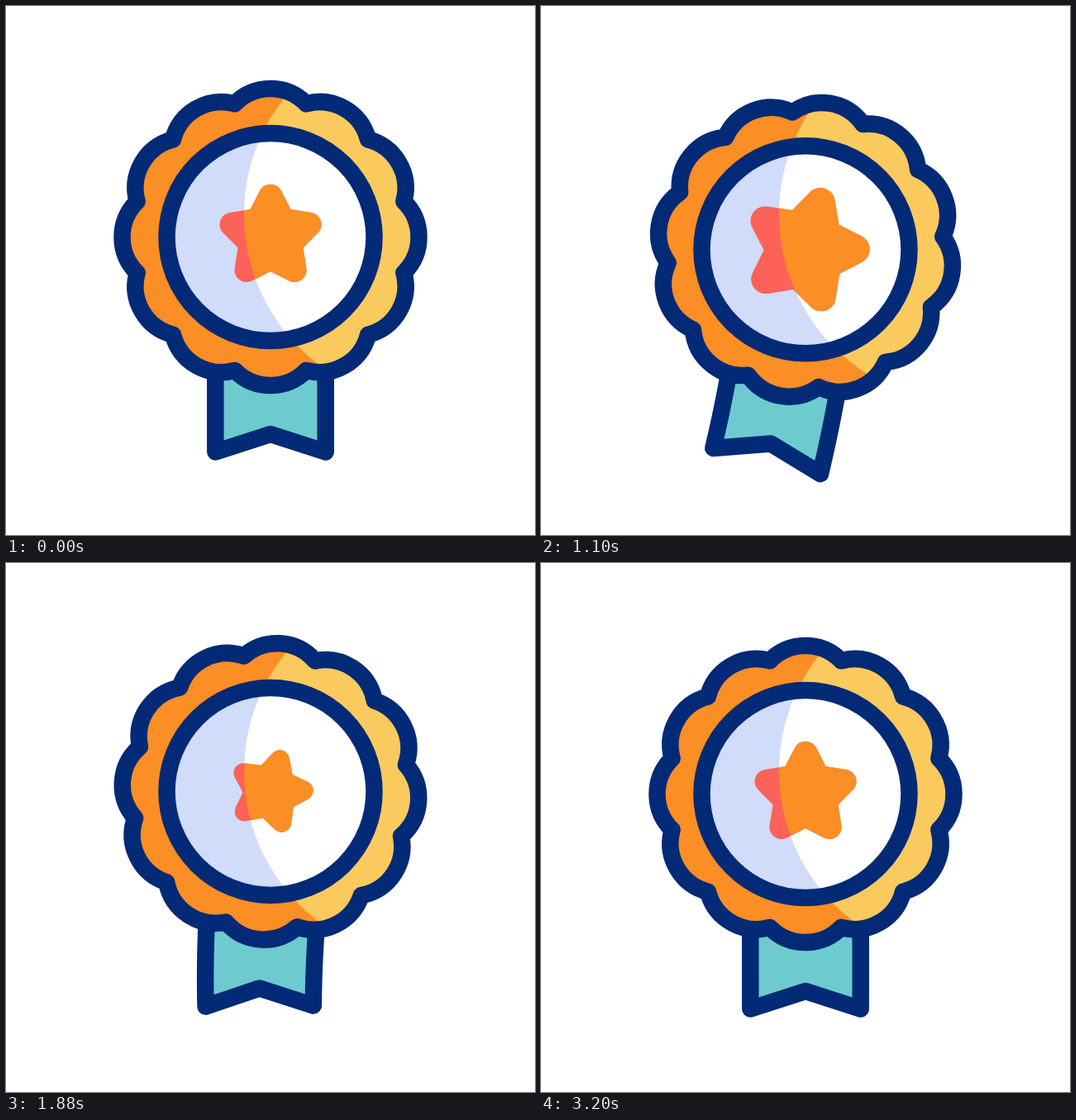
These frames come from a looping animation (640 px wide and 640 px high, 3600 ms). An HTML page with a canvas:

```html
<!DOCTYPE html>
<html lang="en">
<head>
<meta charset="utf-8">
<title>Award badge</title>
<style>
  html, body { margin: 0; width: 100%; height: 100%; overflow: hidden; background: #fff; }
  canvas { display: block; width: 640px; height: 640px; }
</style>
</head>
<body>
<canvas id="stage"></canvas>
<script>
const LOOP = 3600;
const NAVY = '#032a76', TEAL = '#6dcbd0', SPARK = '#ffca50';
const SHADE = { rim: '#fb8e24', face: '#d1dbfa', star: '#fc6257' };
const LIGHT = { rim: '#fbca5e', face: '#ffffff', star: '#fb8e24' };
const LINE = 20.5;
const CX = 320, CY = 279.6;
const RAD = Math.PI / 180;

const canvas = document.getElementById('stage');
const ctx = canvas.getContext('2d');
const dpr = window.devicePixelRatio || 1;
canvas.width = canvas.height = 640 * dpr;

// Keyframes as [time, value]
const LIFT = [[410, 0], [1000, 18], [1580, -20], [2230, 18], [2720, -20], [3210, 0]];
const TILT = [[410, 0], [930, 15], [1540, -15], [2125, 15], [2650, -15], [3190, 0]];
const BEND = [[410, 0], [1000, 5], [1600, -10.5], [2250, 5], [2720, -10.5], [3210, 0]];
const SCALE = [[410, 1], [1180, 1.22], [1950, 0.8], [2720, 1.25], [3210, 1]];
const SPIN = [[410, 0], [760, -1.5], [1380, -106.5], [1880, -199.5],
              [2300, -286], [2720, -329], [3210, -360]];

const clamp = v => Math.min(1, Math.max(0, v));

function find(keys, t) {
  let i = 0;
  while (i < keys.length - 2 && t >= keys[i + 1][0]) i++;
  const [t0, a] = keys[i], [t1, b] = keys[i + 1];
  return { i, a, b, h: t1 - t0, p: clamp((t - t0) / (t1 - t0)) };
}

function ease(keys, t) {
  const { a, b, p } = find(keys, t);
  return a + (b - a) * (1 - Math.cos(Math.PI * p)) / 2;
}

function smooth(keys, t) {
  const { i, a, b, h, p } = find(keys, t);
  const slope = j => j <= 0 || j >= keys.length - 1 ? 0
    : (keys[j + 1][1] - keys[j - 1][1]) / (keys[j + 1][0] - keys[j - 1][0]);
  const q = 1 - p;
  return a * (1 + 2 * p) * q * q + b * p * p * (3 - 2 * p)
    + h * (slope(i) * p * q * q - slope(i + 1) * p * p * q);
}

const polar = (r, deg) => [r * Math.sin(deg * RAD), -r * Math.cos(deg * RAD)];

function rimPath(tilt) {
  const path = new Path2D();
  const notch = 167, lobe = 60.4, mid = 179.5 - lobe;
  const [nx, ny] = polar(notch, 15);
  const half = Math.atan2(nx, -ny - mid);
  for (let k = 0; k < 12; k++) {
    const deg = k * 30 + tilt, [x, y] = polar(mid, deg);
    const up = deg * RAD - Math.PI / 2;
    path.arc(x, y, lobe, up - half, up + half);
  }
  path.closePath();
  return path;
}

function facePath() {
  const path = new Path2D();
  path.arc(0, 0, 125.5, 0, 2 * Math.PI);
  return path;
}

function starPath(scale, spin) {
  const path = new Path2D();
  path.moveTo(...polar(41.5 * scale, spin - 36));
  for (let k = 0; k < 5; k++) {
    const deg = spin + k * 72;
    const inner = polar(41.5 * scale, deg + 36);
    path.arcTo(...polar(81.2 * scale, deg), ...inner, 14.5 * scale);
    path.lineTo(...inner);
  }
  path.closePath();
  return path;
}

function ribbonPath(bend) {
  const path = new Path2D();
  const top = 150, end = 260, side = 66.7;
  const k = (bend * RAD || 1e-6) / (end - top);
  const add = (x, y) => {
    const a = k * Math.max(0, y - top);
    const w = x * (1 + 0.3 * Math.min(0, a));
    const sx = -(1 - Math.cos(a)) / k;
    const sy = y < top ? y : top + Math.sin(a) / k;
    path.lineTo(sx + w * Math.cos(a), sy + w * Math.sin(a));
  };
  for (let y = 110; y <= end; y += 10) add(-side, y);
  add(0, 238.5);
  for (let y = end; y >= 110; y -= 10) add(side, y);
  path.closePath();
  return path;
}

function outline(path) {
  ctx.strokeStyle = NAVY;
  ctx.lineWidth = LINE;
  ctx.stroke(path);
}

function spark(t, x0, y0, x1, y1, start, stop) {
  const head = clamp((t - start) / 200);
  const tail = clamp((t - start - 240) / (stop - start - 240));
  if (head <= tail) return;
  const at = p => [x0 + (x1 - x0) * p, y0 + (y1 - y0) * p];
  ctx.beginPath();
  ctx.moveTo(...at(tail));
  ctx.lineTo(...at(head));
  ctx.strokeStyle = SPARK;
  ctx.lineWidth = 20;
  ctx.stroke();
}

function draw(t) {
  const lift = ease(LIFT, t), tilt = ease(TILT, t);
  const rim = rimPath(tilt), face = facePath();
  const star = starPath(ease(SCALE, t), smooth(SPIN, t));
  const ribbon = ribbonPath(ease(BEND, t));

  ctx.setTransform(dpr, 0, 0, dpr, 0, 0);
  ctx.fillStyle = '#fff';
  ctx.fillRect(0, 0, 640, 640);
  ctx.lineCap = ctx.lineJoin = 'round';

  spark(t, 504, 385, 528, 385, 2620, 3095);
  spark(t, 487.5, 413, 502.5, 441, 2634, 3125);

  ctx.translate(CX, CY + lift);
  ctx.save();
  ctx.rotate(tilt * RAD);
  ctx.fillStyle = TEAL;
  ctx.fill(ribbon);
  outline(ribbon);
  ctx.restore();

  // The light stays fixed on the stage while the badge moves
  const light = new Path2D();
  light.arc(516 - CX, 252 - CY - lift, 228, 0, 2 * Math.PI);
  const paint = (path, part) => {
    ctx.fillStyle = SHADE[part];
    ctx.fill(path);
    ctx.save();
    ctx.clip(light);
    ctx.fillStyle = LIGHT[part];
    ctx.fill(path);
    ctx.restore();
  };
  paint(rim, 'rim');
  outline(rim);
  paint(face, 'face');
  outline(face);
  paint(star, 'star');
}

const begin = performance.now();
function tick() {
  draw((performance.now() - begin) % LOOP);
  requestAnimationFrame(tick);
}
tick();
</script>
</body>
</html>
```
